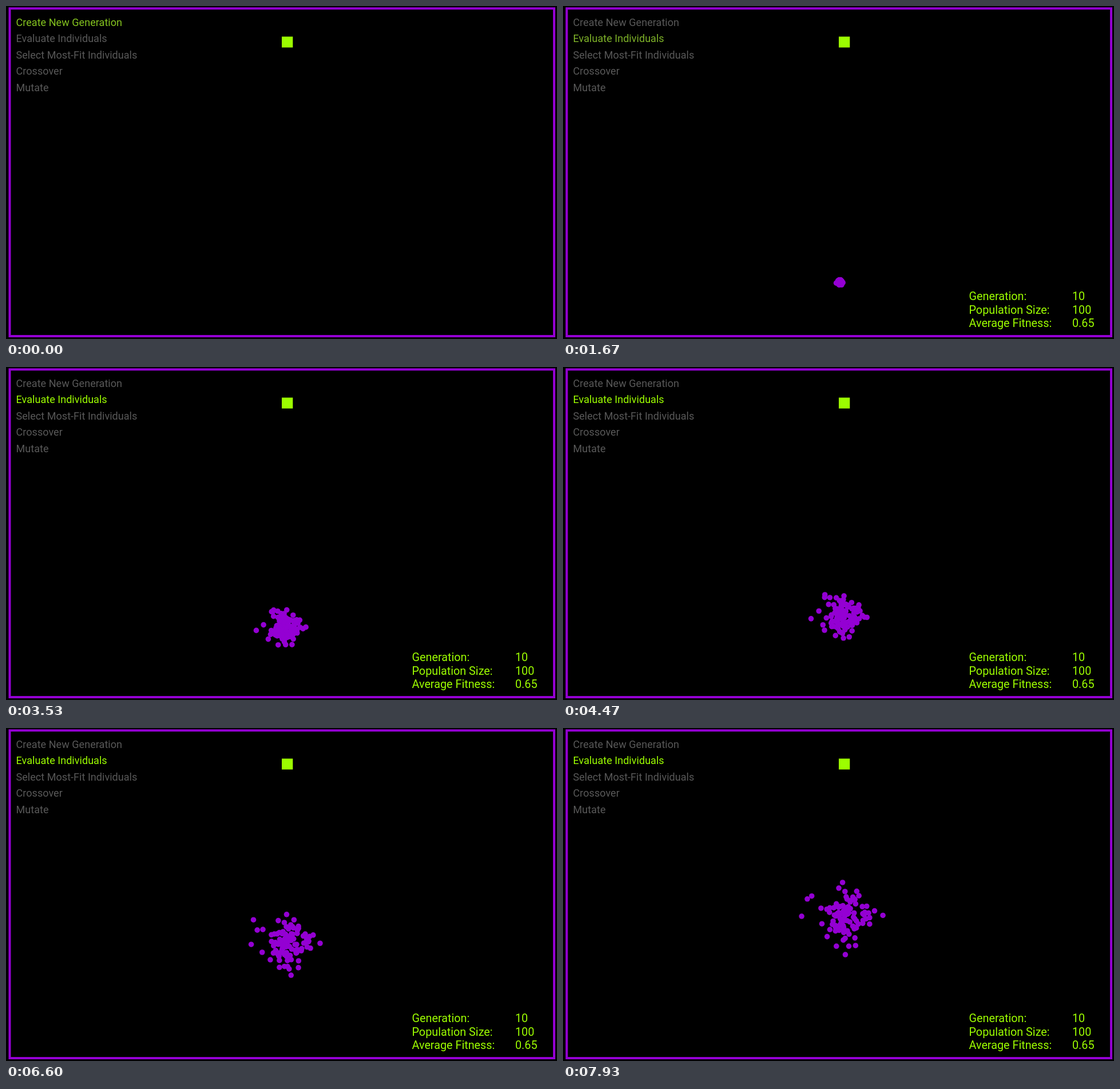
An HTML page with a canvas that plays this animation: 963 px wide and 582 px high, repeating every 8 s.

```html
<!DOCTYPE html>
<html lang="en">
<head>
<meta charset="utf-8">
<title>Genetic algorithm</title>
<style>
  html, body { margin: 0; width: 100%; height: 100%; overflow: hidden; background: #000; }
  canvas { display: block; }
</style>
</head>
<body>
<canvas id="stage" width="963" height="582"></canvas>
<script>
const ctx = document.getElementById('stage').getContext('2d');
const LOOP = 8000;
const BIRTH = 1500;
const POPULATION = 100;
const VIOLET = '#9400d3';
const LIME = [156, 253, 0];
const GREY = [88, 88, 88];
const BLACK = [0, 0, 0];
const MENU = ['Create New Generation', 'Evaluate Individuals', 'Select Most-Fit Individuals', 'Crossover', 'Mutate'];
const STATS = [['Generation:', '10'], ['Population Size:', '100'], ['Average Fitness:', '0.65']];

let seed = 7;
function random() {
  seed = (seed * 1664525 + 1013904223) % 4294967296;
  return seed / 4294967296;
}

// Radii follow a normal distribution; each dot slowly drifts around the centre.
const dots = Array.from({ length: POPULATION }, (_, i) => ({
  radius: Math.sqrt(-2 * Math.log(1 - (i + 0.5) / POPULATION)),
  angle: random() * Math.PI * 2,
  spin: (random() - 0.5) * 0.3,
  sway: random() * Math.PI * 2,
}));

const fade = (t, start, end) => Math.min(1, Math.max(0, (t - start) / (end - start)));
const mix = (a, b, k) => `rgb(${a.map((v, i) => Math.round(v + (b[i] - v) * k))})`;

function text(string, x, y, size, colour) {
  ctx.font = `${size}px Roboto, sans-serif`;
  ctx.fillStyle = colour;
  ctx.fillText(string, x, y);
}

function drawSwarm(t) {
  if (t < BIRTH) return;
  const s = (t - BIRTH) / 1000;
  const x = 484 + 1.2 * s;
  const y = 485 - 10 * s - 2.15 * s * s;
  const spread = 24 * (1 - Math.exp(-s / 2.2));
  ctx.fillStyle = VIOLET;
  for (const { radius, angle, spin, sway } of dots) {
    const reach = spread * radius * (1 + 0.15 * Math.sin(sway + s * 0.8));
    const heading = angle + spin * s;
    ctx.beginPath();
    ctx.arc(x + reach * Math.cos(heading), y + reach * Math.sin(heading), 4.8, 0, Math.PI * 2);
    ctx.fill();
  }
}

function draw(t) {
  ctx.fillStyle = '#000';
  ctx.fillRect(0, 0, 963, 582);

  ctx.strokeStyle = VIOLET;
  ctx.lineWidth = 4;
  ctx.strokeRect(6.5, 4.3, 951.5, 572.7);
  ctx.fillStyle = mix(BLACK, LIME, 1);
  ctx.fillRect(482, 53.5, 19.3, 19);

  const glow = [0.65 * (1 - fade(t, 0, 500)), fade(t, 1400, 1900)];
  MENU.forEach((label, i) => text(label, 17.5, 34.8 + i * 28.5, 18.1, mix(GREY, LIME, glow[i] || 0)));

  const statColour = mix(BLACK, LIME, fade(t, 450, 1400));
  STATS.forEach(([label, value], i) => {
    const y = 514 + i * 23.6;
    text(label, 709.5, y, 19.8, statColour);
    text(value, 890, y, 19.8, statColour);
  });

  drawSwarm(t);
}

const start = performance.now();
function tick() {
  draw((performance.now() - start) % LOOP);
  requestAnimationFrame(tick);
}
tick();
</script>
</body>
</html>
```
